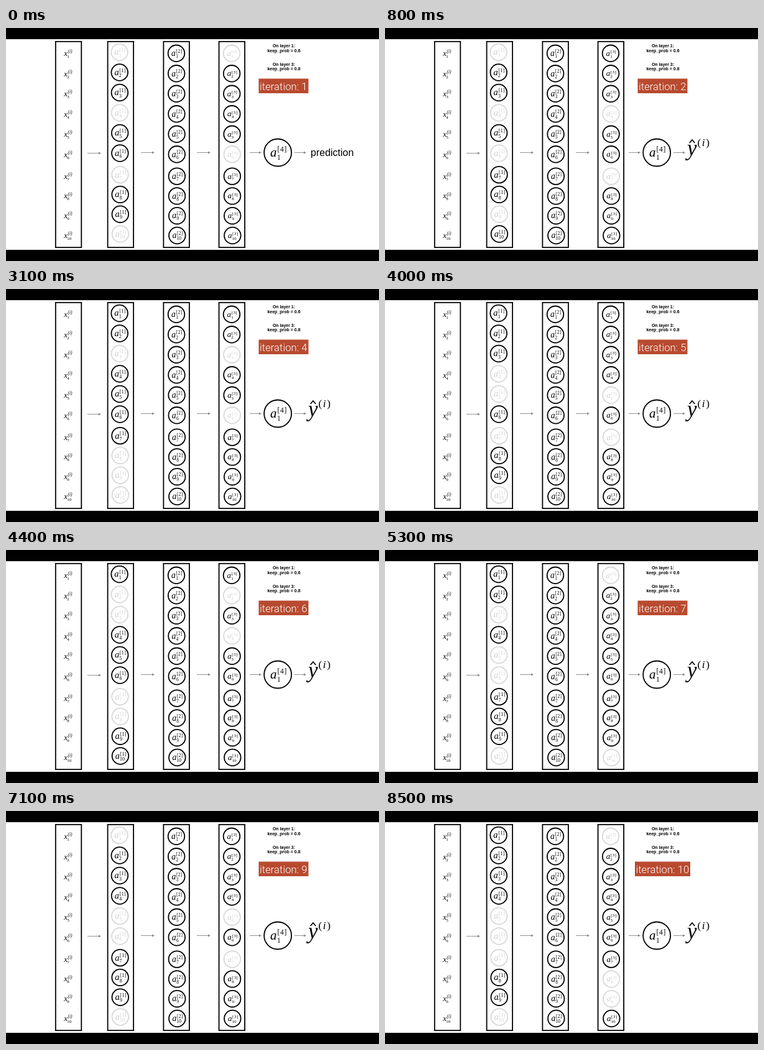
An HTML page for the animation above (8600 ms loop, 600 by 375 pixels).

```html
<!DOCTYPE html>
<html>
<head>
<meta charset="utf-8">
<style>
html, body { margin: 0; width: 100%; height: 100%; overflow: hidden; background: #fff; }
svg { display: block; width: 600px; height: 375px; }
.math { font-family: "Liberation Serif", "Times New Roman", serif; }
.it { font-style: italic; }
.sans { font-family: "Liberation Sans", Arial, sans-serif; }
.note { font-weight: bold; text-anchor: middle; }
.light { font-family: Roboto, "Liberation Sans", sans-serif; font-weight: 300; text-anchor: middle; }
.unit { --ink: #000; --ring: #000; fill: var(--ink); }
.unit.off { --ink: #d0d0d0; --ring: #d8d8d8; }
circle { fill: none; stroke: var(--ring, #000); stroke-width: 1.8; }
</style>
</head>
<body>
<svg id="stage" viewBox="0 0 600 375"></svg>
<script>
const PERIOD = 900, LEAD = 100, LOOP = 8600;

// Units switched off in layers 1 and 3, one word per iteration; 0 is unit 10
const drops = "1470:16 1469:47 3469:80 3890:36 4570:57 2378:24 3560:10 2489:367 1560:57 5670:189"
  .split(" ").map(word => word.split(":"));

const $ = id => document.getElementById(id);
const units = [...Array(10).keys()];

// The upper six rows hang from the top, the lower four stand on the bottom
const rowY = (top, bottom, i) => i < 6 ? top + 32.5 * i : bottom - 31.8 * (9 - i);

const text = (x, y, str, size, cls = "math") =>
  `<text x="${x}" y="${y}" class="${cls}" font-size="${size}">${str}</text>`;

const arrow = (x, y = 200.5, length = 22) =>
  `<path d="M${x} ${y}h${length - 3}" stroke="#888" stroke-width=".9"/>
   <path d="M${x + length - 4} ${y - 2}l4 2l-4 2z" fill="#888"/>`;

const frame = x =>
  `<rect x="${x}" y="21.8" width="41.5" height="331.4" fill="none" stroke="#000" stroke-width="1.8"/>`;

const note = (y, layer, keep) =>
  text(447, y, `On layer ${layer}:`, 7, "sans note") +
  text(447, y + 7.8, `keep_prob = ${keep}`, 7, "sans note");

function node(id, x, y, radius, scale, layer, index) {
  return `<g id="${id}" class="unit" transform="translate(${x} ${y})">
    <circle r="${radius}"/>
    <g transform="scale(${scale})">
      ${text(-8.4, 4.5, "a", 14.5, "math it")}
      <g letter-spacing=".4">${text(-.4, -.9, `[${layer}]`, 8)}</g>
      ${text(-.9, 7.7, index, 8)}
    </g></g>`;
}

function column(layer) {
  const x = [182.6, 274, 363][layer - 1];
  const [top, bottom] = layer == 1 ? [39, 331.5] : [40.8, 334];
  return units.map(i => node(`u${layer}-${i}`, x + i * .15, rowY(top, bottom, i),
    13.3, 1.04 - .05 * layer, layer, i + 1)).join("");
}

function input(i) {
  const y = rowY(41, 334, i);
  return text(93.3, y + 4, "x", 12.5, "math it") +
    text(99.5, y - .8, "(i)", 7.5, "math it") +
    text(98.3, y + 7, i + 1, 7);
}

$("stage").innerHTML = `
  <rect width="600" height="18"/>
  <rect y="357" width="600" height="18"/>
  ${[79.8, 163.6, 253.4, 342.6].map(frame).join("")}
  ${units.map(input).join("")}
  ${[1, 2, 3].map(column).join("")}
  ${arrow(131, 201.5)}${arrow(217)}${arrow(307)}${arrow(392, 200.5, 19)}${arrow(464, 200.5, 19)}
  ${node("out", 437.2, 200.5, 22, 1.45, 4, 1)}
  ${note(31, 1, .6)}${note(60.5, 3, .8)}
  <rect id="badge" y="81.5" height="23.5" fill="#b84a2f"/>
  ${text(446.3, 99.5, `<tspan id="count"></tspan>`, 16.7, "light\" fill=\"#fff")}
  <g id="word">${text(490, 206.3, "prediction", 16, "sans")}</g>
  <g id="yhat">
    ${text(486, 204.5, "y", 35, "math it")}
    <path d="M489.7 185L494 180L498.3 185" fill="none" stroke="#000" stroke-width="1.7"/>
    ${text(502.5, 189.5, "(", 17.5)}${text(509.8, 189.5, "i", 17.5, "math it")}${text(516.3, 189.5, ")", 17.5)}
  </g>`;

function show(n) {
  [1, 3].forEach((layer, k) => units.forEach(i =>
    $(`u${layer}-${i}`).classList.toggle("off", drops[n][k].includes((i + 1) % 10))));
  const label = `iteration: ${n + 1}`;
  const width = 80 + 9 * (label.length - 12);
  $("badge").setAttribute("width", width);
  $("badge").setAttribute("x", 446.5 - width / 2);
  $("count").textContent = label;
  $("word").style.display = n ? "none" : "";
  $("yhat").style.display = n ? "" : "none";
}

let shown = -1;
function tick() {
  const t = performance.now() % LOOP;
  const n = Math.floor((t + LEAD) / PERIOD);
  if (n != shown) show(shown = n);
  requestAnimationFrame(tick);
}
tick();
</script>
</body>
</html>
```
